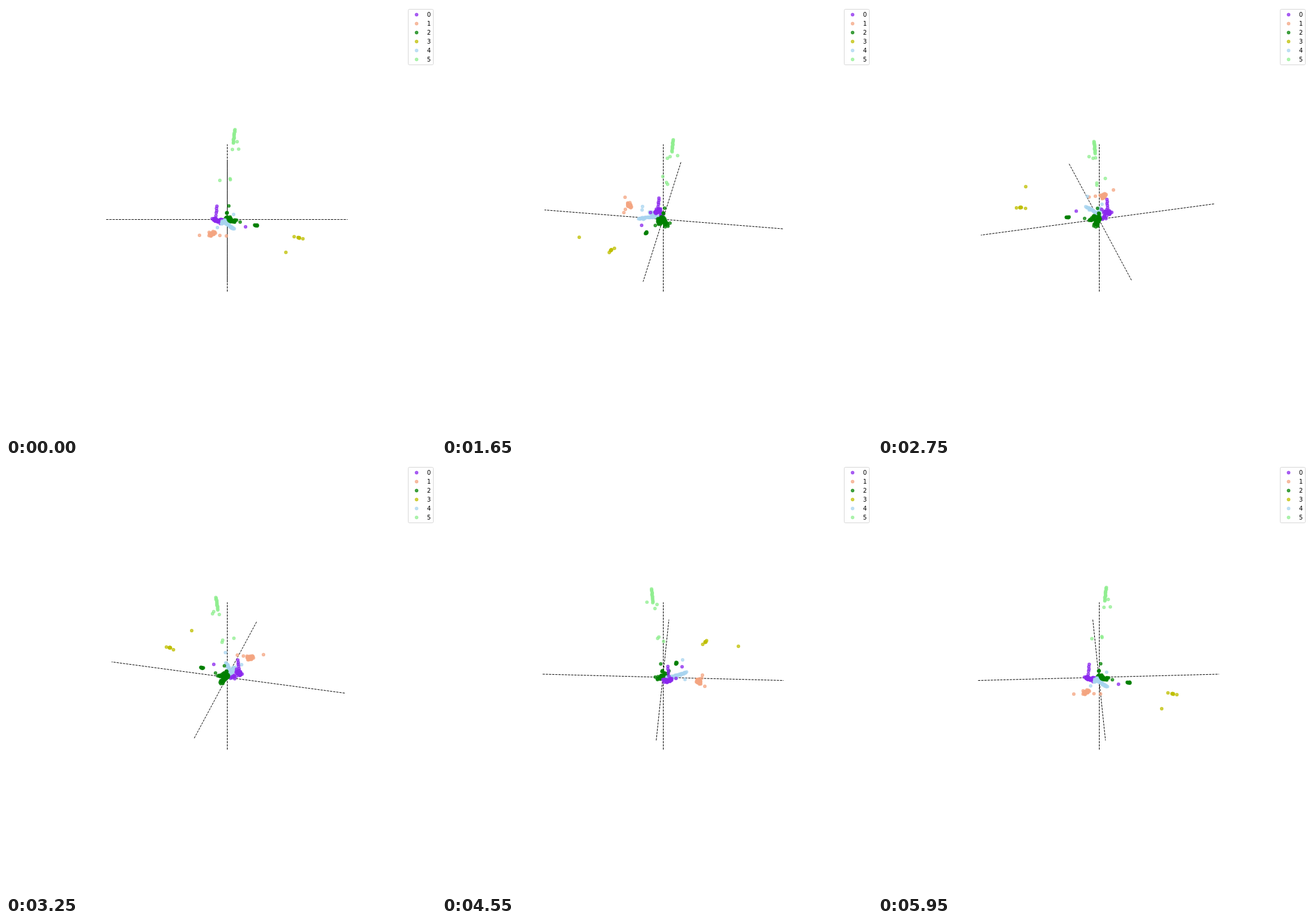
Animation, 720 px wide and 720 px high, one loop 6000 ms. Source, as an HTML page:

```html
<!DOCTYPE html>
<html lang="en">
<head>
<meta charset="utf-8">
<title>Rotating 3D scatter</title>
<style>
  html, body { margin: 0; width: 100%; height: 100%; overflow: hidden; background: #fff; }
  svg { display: block; width: 720px; height: 720px; }
  circle { r: 2.24px; stroke-width: 1.5px; fill-opacity: .7; stroke-opacity: .7; }
  line { stroke: #000; stroke-width: 1; stroke-dasharray: 3.7 1.6; }
  text { font: 10px "DejaVu Sans", sans-serif; fill: #000; }
</style>
</head>
<body>
<svg viewBox="0 0 720 720">
  <g id="axes"></g>
  <g id="cloud"></g>
  <g id="legend">
    <rect x="673.5" y="5.5" width="42" height="93" rx="2" fill="#fff" fill-opacity=".8" stroke="#ccc" stroke-opacity=".8"/>
  </g>
</svg>
<script>
const LOOP = 6000, STEP = 50;
const CENTER = { x: 369.8, y: 357.2 };
const CAMERA = 3915;
const SIN_ELEV = 0.5, COS_ELEV = Math.sqrt(0.75);
const SPAN = 202, HEIGHT = 142.3;

let seed = 7;
function random() {
  seed = (seed * 16807) % 2147483647;
  return seed / 2147483647;
}

// Points strung evenly over center ± reach, each shaken by up to spread.
function blob(count, center, reach, spread) {
  return Array.from({ length: count }, (_, i) => {
    const t = 2 * i / (count - 1) - 1;
    return center.map((c, k) => c + reach[k] * t + (random() + random() - 1) * spread);
  });
}

const groups = [
  { color: '#8c29ee', points: [
    ...blob(32, [11, -18.5, 4.5], [3, 4, 0], 4),
    ...blob(9, [4, -10, 0], [-2, 4, -1], 2.5),
    ...blob(5, [10, -17.5, 22], [-1, .5, 8], .8),
    [30.8, 31.1, 3.5], [22.6, -11, 5]] },
  { color: '#f4a582', points: [
    ...blob(28, [61, -24.5, 8], [-2.5, 5, .7], 4),
    [71.9, -45, 11], [66.3, -.7, 6.6], [65.6, -11.5, 7]] },
  { color: '#008000', points: [
    ...blob(46, [-2.5, 3, -1.5], [-5, 5, -4.5], 4),
    ...blob(20, [5, 10, 0], [-2, 5, -2], 3),
    ...blob(10, [20.2, 48.8, 0], [.6, 2, 0], .8),
    ...blob(4, [-1.2, .3, 12], [.3, .3, .5], .6),
    [-3.7, 3.3, 23.8], [9.2, 22.2, 0], [-13, 5.5, -3]] },
  { color: '#bfbf00', points: [
    ...blob(6, [66.8, 119, 3.5], [.4, 1.2, 0], .8),
    [62.6, 111.1, 3], [68.7, 125.4, 2.7], [124, 96, 9.5]] },
  { color: '#a8d4f0', points: [
    ...blob(22, [15, -5.4, 3.5], [9, -2, 3.5], 3),
    ...blob(28, [26.6, 4, 3], [12, 7.2, 1], 2),
    [32.5, 11.2, 28.2], [37.8, -15.6, 6]] },
  { color: '#90ee90', points: [
    ...blob(14, [-18, 11.8, 147.5], [1.4, -1.4, -12], .8),
    [-27.2, 17, 132.8], [-10.7, 19.5, 127.7], [-13.5, 9.2, 125.5],
    [1.9, -11.6, 75.5], [-6.9, 5.3, 74], [-8.9, 5.8, 71.1]] }
];

const axes = [[SPAN, 0, 0], [0, SPAN, 0], [0, 0, HEIGHT]];

function add(parent, tag, attrs = {}) {
  const node = document.createElementNS('http://www.w3.org/2000/svg', tag);
  setAll(node, attrs);
  return parent.appendChild(node);
}

function setAll(node, attrs) {
  for (const key in attrs) node.setAttribute(key, attrs[key]);
}

const byId = id => document.getElementById(id);
const cloud = byId('cloud'), legend = byId('legend');

groups.forEach((group, i) => {
  const paint = { fill: group.color, stroke: group.color };
  group.node = add(cloud, 'g', paint);
  group.dots = group.points.map(point => ({ point, node: add(group.node, 'circle') }));
  const y = 14.5 + 15 * i;
  add(legend, 'circle', { cx: 687.5, cy: y, ...paint });
  add(legend, 'text', { x: 705, y: y + 3.5 }).textContent = i;
});
const axisLines = axes.map(() => add(byId('axes'), 'line'));

function project([x, y, z], angle) {
  const c = Math.cos(angle), s = Math.sin(angle);
  const right = y * c - x * s, toward = x * c + y * s;
  const up = z * COS_ELEV - toward * SIN_ELEV;
  const near = toward * COS_ELEV + z * SIN_ELEV;
  const scale = 1 / (1 - near / CAMERA);
  return { x: CENTER.x + right * scale, y: CENTER.y - up * scale, near };
}

// Upright and level lines sit on pixel centres so they stay crisp.
function snap(a, b, key) {
  if (Math.abs(a[key] - b[key]) < .01) a[key] = b[key] = Math.round(a[key]) + .5;
}

function draw(time) {
  const angle = Math.floor((time % LOOP) / STEP) * STEP / LOOP * 2 * Math.PI;

  axes.forEach((end, i) => {
    const a = project(end.map(v => -v), angle), b = project(end, angle);
    snap(a, b, 'x');
    snap(a, b, 'y');
    setAll(axisLines[i], { x1: a.x, y1: a.y, x2: b.x, y2: b.y });
  });

  for (const group of groups) {
    group.near = -Infinity;
    for (const { point, node } of group.dots) {
      const p = project(point, angle);
      setAll(node, { cx: p.x, cy: p.y });
      group.near = Math.max(group.near, p.near);
    }
  }
  // The group reaching closest to the viewer is painted last.
  [...groups].sort((a, b) => a.near - b.near).forEach(g => cloud.appendChild(g.node));
}

const start = performance.now();
function tick() {
  draw(performance.now() - start);
  requestAnimationFrame(tick);
}
tick();
</script>
</body>
</html>
```
